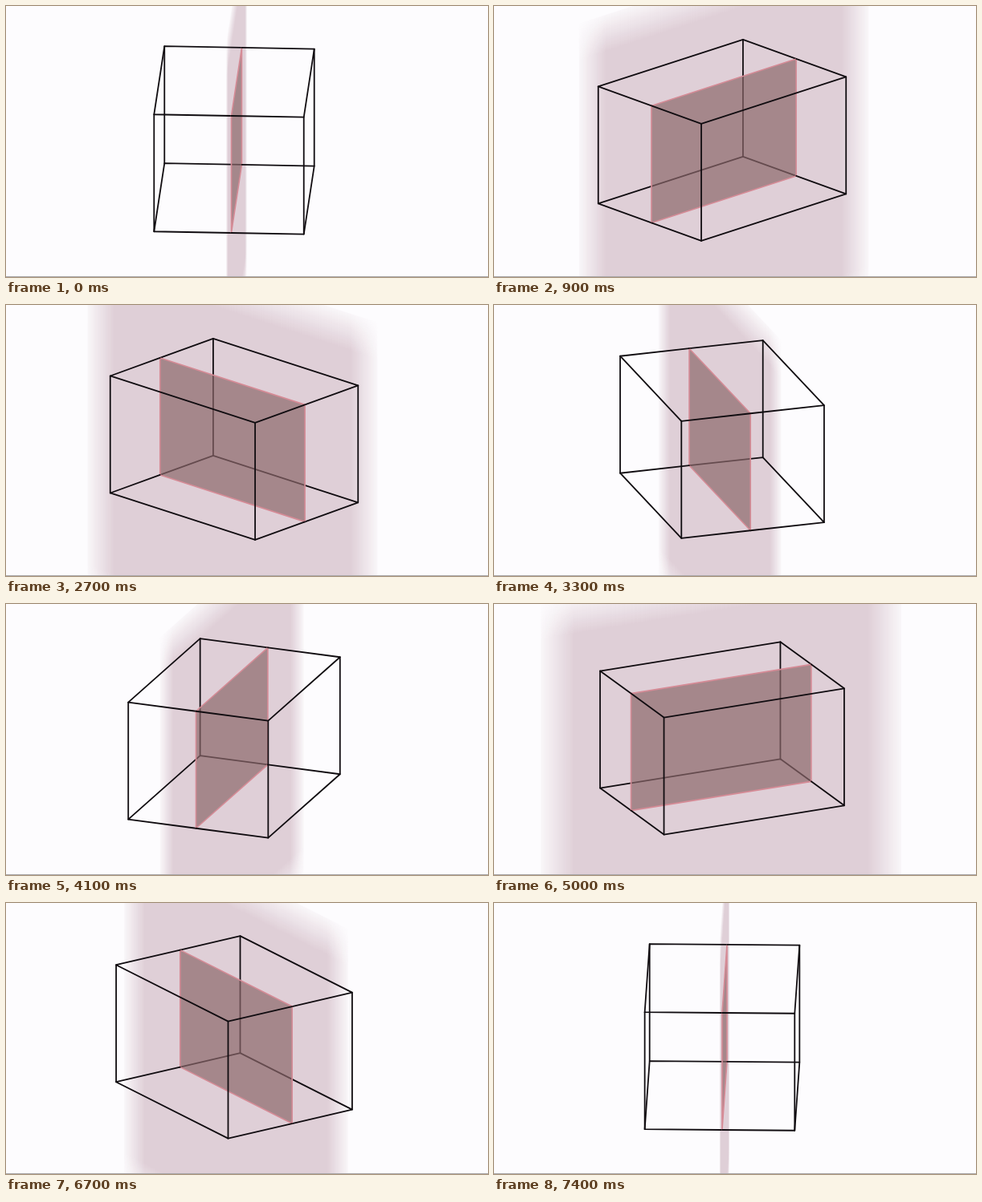
An HTML page with a canvas that plays this animation: 600 px wide and 338 px high, repeating every 7500 ms.

```html
<!DOCTYPE html>
<html>
<head>
<meta charset="utf-8">
<title>Box cut by a plane</title>
<style>
html, body { margin: 0; height: 100%; overflow: hidden; background: #fdfcfe; }
canvas { display: block; }
</style>
</head>
<body>
<canvas id="stage" width="600" height="338"></canvas>
<script>
const ctx = document.getElementById('stage').getContext('2d');
const LOOP = 7500, STEP = 100;
const CX = 284, CY = 167.4, TILT = 0.3434;
const LEN = 124, WID = 93.35, HIGH = 73;   // half sizes of the box
const CUT = 3;                             // plane's offset across the box
const REACH = 248, TOP = 205, BOTTOM = 261, FADE = 46;

// Turn of the box: time in ms, angle in degrees
const TURN = [
  [0, -87], [900, -43.4], [2100, 14.6], [3300, 72.1], [4800, 145.3],
  [5000, 154.8], [6400, 223.3], [6700, 235.8], [7200, 260.6], [7400, 271.4]
];

function angleAt(t) {
  let i = 1;
  while (i < TURN.length - 1 && TURN[i][0] < t) i++;
  const [t0, a0] = TURN[i - 1], [t1, a1] = TURN[i];
  return (a0 + (a1 - a0) * (t - t0) / (t1 - t0)) * Math.PI / 180;
}

// The large sheet, solid inside and soft along its edges
function makeSheet() {
  const sheet = document.createElement('canvas');
  const w = sheet.width = REACH * 2, h = sheet.height = TOP + BOTTOM;
  const g = sheet.getContext('2d');
  g.fillStyle = '#dfcfd7';
  g.fillRect(0, 0, w, h);
  g.globalCompositeOperation = 'destination-in';
  for (const [x, y, size] of [[w, 0, w], [0, h, h]]) {
    const fade = g.createLinearGradient(0, 0, x, y), edge = FADE / size;
    fade.addColorStop(0, 'rgba(0,0,0,0.12)');
    fade.addColorStop(edge, '#000');
    fade.addColorStop(1 - edge, '#000');
    fade.addColorStop(1, 'rgba(0,0,0,0.12)');
    g.fillStyle = fade;
    g.fillRect(0, 0, w, h);
  }
  return sheet;
}
const sheet = makeSheet();

function draw(t) {
  const a = angleAt(t), c = Math.cos(a), s = Math.sin(a);
  // u runs along the plane, w across it, v down the screen
  const at = (u, w, v) => [CX + u * c - w * s, CY + TILT * (u * s + w * c) + v];
  const trace = points => {
    ctx.beginPath();
    points.forEach(p => ctx.lineTo(...p));
  };

  function half(side) {
    const w = side * WID;
    ctx.strokeStyle = '#100c10';
    ctx.lineWidth = 1.8;
    for (const v of [-HIGH, HIGH]) {
      trace([at(-LEN, side * 0.01 + CUT, v), at(-LEN, w, v), at(LEN, w, v), at(LEN, CUT, v)]);
      ctx.stroke();
    }
    for (const u of [-LEN, LEN]) {
      trace([at(u, w, -HIGH), at(u, w, HIGH)]);
      ctx.stroke();
    }
  }

  ctx.setTransform(1, 0, 0, 1, 0, 0);
  ctx.fillStyle = '#fdfcfe';
  ctx.fillRect(0, 0, 600, 338);

  ctx.setTransform(c, TILT * s, 0, 1, ...at(0, CUT, 0));
  ctx.drawImage(sheet, -REACH, -TOP);
  ctx.setTransform(1, 0, 0, 1, 0, 0);

  ctx.lineJoin = ctx.lineCap = 'round';
  const front = c > 0 ? 1 : -1;
  half(-front);
  trace([at(-LEN, CUT, -HIGH), at(LEN, CUT, -HIGH), at(LEN, CUT, HIGH), at(-LEN, CUT, HIGH)]);
  ctx.closePath();
  ctx.fillStyle = 'rgba(139,104,106,0.69)';
  ctx.fill();
  ctx.strokeStyle = '#d58b96';
  ctx.lineWidth = 1.6;
  ctx.stroke();
  half(front);

  ctx.fillStyle = '#aaa8aa';
  ctx.fillRect(0, 337, 600, 1);
}

const start = performance.now();
function tick() {
  const t = (performance.now() - start) % LOOP;
  draw(Math.floor(t / STEP) * STEP);
  requestAnimationFrame(tick);
}
tick();
</script>
</body>
</html>
```
